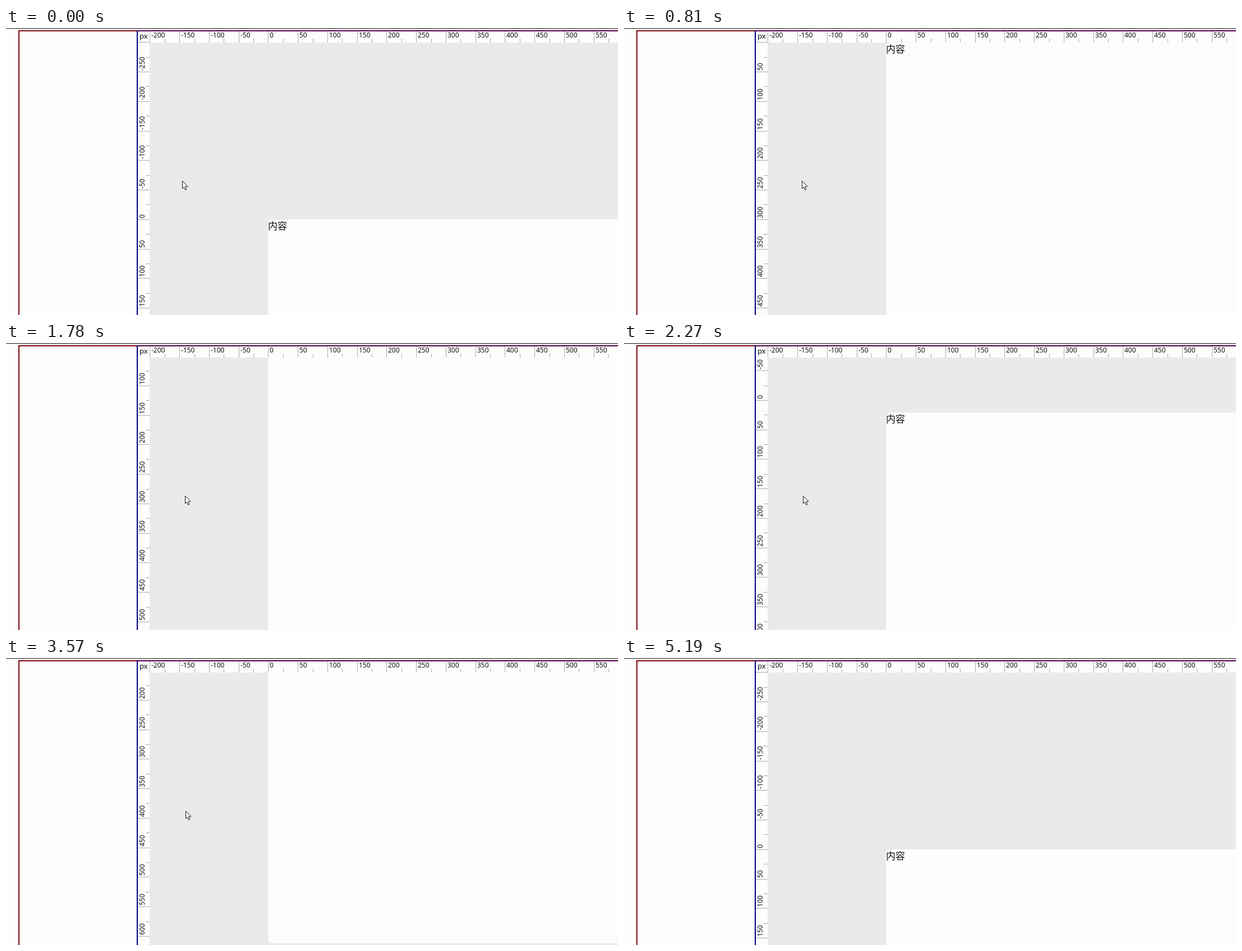
An HTML page with a canvas for the animation above (5270 ms loop, 1091 px wide and 513 px high).

```html
<!DOCTYPE html>
<html lang="zh-CN">
<head>
<meta charset="utf-8">
<title>Ruler scrolling</title>
<style>
html, body { margin: 0; width: 100%; height: 100%; overflow: hidden; background: #fdfdfc; }
canvas { display: block; }
</style>
</head>
<body>
<canvas id="stage" width="1091" height="513"></canvas>
<script>
const W = 1091, H = 513, LOOP = 5270;
const SCALE = 1.055, LEFT = 256, TOP = 26, X0 = 467.4, Y0 = 342.3;
const PAGE_HEIGHT = 600 * SCALE, RULER_LAG = 16;
const EXIT = 4090, GONE = 4620;
const PAPER = '#fdfdfc', INK = '#111';
const ARROW = new Path2D('M0 0V13.5L3 10.8L5.2 16L7.4 15L5.2 10L9.5 9.6Z');
const ctx = document.getElementById('stage').getContext('2d');

const progress = (t, from, to) => Math.min(1, Math.max(0, (t - from) / (to - from)));
const smooth = u => u * u * (3 - 2 * u);
const easeOut = (u, power) => 1 - (1 - u) ** power;

// Three trips down the page and back to the top
function scrollAt(t) {
  const move = (distance, from, to) => distance * smooth(progress(t, from, to));
  return move(300, 20, 760) - move(300, 890, 1290)
    + move(400, 1326, 1886) - move(400, 2046, 2506)
    + move(200, 2578, 2948) + move(300, 2948, 3340) - move(500, 3430, 4090);
}

function box(color, x, y, w, h) {
  ctx.fillStyle = color;
  ctx.fillRect(x, y, w, h);
}

function label(text, x, y, font = '12px "Noto Sans", "Open Sans", sans-serif') {
  ctx.fillStyle = INK;
  ctx.font = font;
  ctx.fillText(text, x, y);
}

function clipped(x, y, w, h, draw) {
  ctx.save();
  ctx.beginPath();
  ctx.rect(x, y, w, h);
  ctx.clip();
  draw();
  ctx.restore();
}

function topRuler() {
  for (let v = -200; v < 600; v += 25) {
    const x = Math.round(X0 + v * SCALE), major = v % 50 === 0;
    box('#aaa', x, major ? 5 : 19, 1, major ? 21 : 7);
    if (major) label(v, x + 3, 17);
  }
}

function leftRuler(scroll) {
  for (let v = -300; v <= 1100; v += 25) {
    const y = Math.floor(Y0 + (v - scroll) * SCALE), major = v % 50 === 0;
    box('#aaa', major ? 235 : 249, y, major ? 21 : 7, 1);
    if (!major) continue;
    ctx.save();
    ctx.translate(247, y - 2);
    ctx.rotate(-Math.PI / 2);
    label(v, 0, 0);
    ctx.restore();
  }
}

function page(scroll) {
  const y = Y0 - scroll * SCALE;
  box('#eaeaea', LEFT, TOP, W - LEFT, H - TOP);
  ctx.fillStyle = PAPER;
  ctx.beginPath();
  ctx.roundRect(467, y, W, PAGE_HEIGHT, 8);
  ctx.fill();
  label('内容', 467, y + 17.8, '300 16.9px "Noto Sans CJK SC", sans-serif');
}

function pointer(t) {
  const leave = progress(t, EXIT, GONE);
  const x = 314 + 6 * Math.sqrt(progress(t, 0, 2800)) + 686 * easeOut(leave, 5);
  const y = 273 + 240 * easeOut(leave, 3);
  ctx.save();
  ctx.translate(Math.round(x) + 0.5, Math.round(y) + 0.5);
  ctx.fillStyle = '#fff';
  ctx.fill(ARROW);
  ctx.strokeStyle = INK;
  ctx.stroke(ARROW);
  ctx.restore();
}

function draw(t) {
  box(PAPER, 0, 0, W, H);
  clipped(LEFT, TOP, W - LEFT, H - TOP, () => page(scrollAt(t)));
  topRuler();
  clipped(235, TOP - 1, 21, H, () => leftRuler(scrollAt(t - RULER_LAG)));
  label('px', 238, 18.5, '13px "Noto Sans", "Open Sans", sans-serif');

  box(INK, 0, 0, W, 1);
  box('#800c10', 22, 4, 212, 2);
  box('#800c10', 22, 4, 2, H);
  box('#580050', 233, 4, W, 2);
  box('#000080', 233, 5, 2, H);

  if (t < GONE) pointer(t);
}

const start = performance.now();
function tick() {
  draw((performance.now() - start) % LOOP);
  requestAnimationFrame(tick);
}
tick();
</script>
</body>
</html>
```
